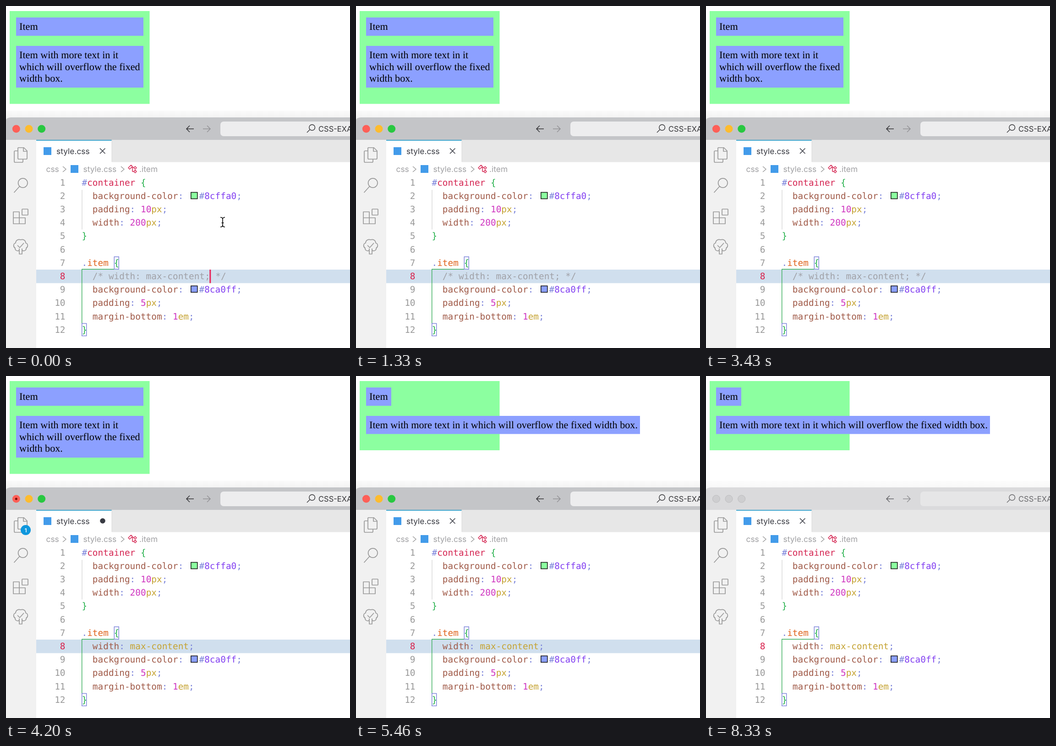
Write an HTML page that moves like this. It is 751x746 px and loops after 8.4 s.

```html
<!DOCTYPE html>
<html lang="en">
<head>
<meta charset="utf-8">
<title>max-content demo</title>
<style>
  html, body { margin: 0; width: 100%; height: 100%; overflow: hidden; background: #fff; }
  svg { display: block; width: 751px; height: 746px; }
  text { white-space: pre; text-rendering: geometricPrecision; }
  .page { font: 22.2px "Liberation Serif", serif; }
  .ui { font: 17.4px Inter, sans-serif; }
  .code { font: 19.4px "DejaVu Sans Mono", monospace; }
  .num { fill: #999; text-anchor: end; }
  .now { fill: #d8204c; }
  .punct { fill: #7a82da; }
  .id { fill: #d52753; }
  .class { fill: #df631c; }
  .brace { fill: #23b04a; }
  .prop { fill: #a05a48; }
  .value { fill: #c5a332; }
  .number { fill: #ce33c0; }
  .hex { fill: #823ff1; }
  .comment { fill: #a0a1a7; }
  .line { fill: none; stroke: #999; stroke-width: 1.7; stroke-linejoin: round; }
</style>
</head>
<body>
<svg viewBox="0 0 751 746">
  <defs>
    <linearGradient id="shade" x2="0" y2="1">
      <stop stop-color="#fbfbfb"/><stop offset="1" stop-color="#ebebeb"/>
    </linearGradient>
  </defs>

  <!-- Web page -->
  <g class="page">
    <rect id="box" x="8" y="11" width="305.5" fill="#8cffa0"/>
    <rect id="short" x="22" y="25" height="40" fill="#8ca0ff"/>
    <rect id="long" x="22" y="87" fill="#8ca0ff"/>
    <text x="29" y="52">Item</text>
    <g id="wrapped">
      <text x="29" y="114">Item with more text in it</text>
      <text x="29" y="139.7">which will overflow the fixed</text>
      <text x="29" y="165.4">width box.</text>
    </g>
    <text id="single" x="29" y="114">Item with more text in it which will overflow the fixed width box.</text>
  </g>

  <!-- Title bar -->
  <rect id="shadow" y="228" width="751" height="30" fill="url(#shade)"/>
  <path id="bar" d="M-2 292V255Q-2 243 12 243H751V292Z"/>
  <g id="lights">
    <circle cx="22.3" cy="268" r="8.5" fill="#fe5f57"/>
    <circle cx="50" cy="268" r="8.5" fill="#febc2e"/>
    <circle cx="77.7" cy="268" r="8.5" fill="#28c840"/>
    <circle id="unsaved" cx="22.3" cy="268" r="2.6" fill="#7d0a08"/>
  </g>
  <g id="dim" fill="#ceced0" stroke="#bdbdbf">
    <circle cx="22.3" cy="268" r="8"/><circle cx="50" cy="268" r="8"/><circle cx="77.7" cy="268" r="8"/>
  </g>
  <rect id="search" x="468" y="252" width="300" height="32" rx="7"/>
  <g id="title">
    <path d="M410 268H394M401 261L394 268L401 275" fill="none" stroke="currentColor" stroke-width="1.5"/>
    <path d="M430 268H446M439 261L446 268L439 275" fill="none" stroke="#929295" stroke-width="1.5"/>
    <path d="M663 270L657 276M674.5 265A6.3 6.3 0 1 1 661.9 265A6.3 6.3 0 1 1 674.5 265Z" fill="none" stroke="currentColor" stroke-width="1.4"/>
    <text class="ui" x="682" y="274" style="font-size:16.5px" fill="currentColor">CSS-EXAMPLES</text>
  </g>

  <!-- Activity bar -->
  <rect y="292" width="66" height="454" fill="#f1f1f1"/>
  <g class="line">
    <path d="M26 309H39L46 316V332Q46 334 44 334H28Q26 334 26 332V309M38 309V317H46M26 316H20Q18 316 18 318V339Q18 341 20 341H35Q37 341 37 339V334"/>
    <path d="M30 393L17.5 407M47 386A10.2 10.2 0 1 1 26.6 386A10.2 10.2 0 1 1 47 386Z"/>
    <path d="M16 449H29V462H42V475H16ZM16 462H29V475"/>
    <rect x="35" y="443" width="13" height="13" rx="1"/>
    <path d="M29 529V541H35V529M29 533C24 536 19 532 20 528C15 525 16 518 21 517C21 511 27 508 32 510C37 508 43 511 43 517C48 518 49 525 44 528C45 532 40 536 35 533M25 522L30 527L39 517"/>
  </g>
  <g id="badge">
    <circle cx="43" cy="336" r="11" fill="#0e97dd"/>
    <text class="ui" x="43" y="340.5" text-anchor="middle" style="font-size:12px;font-weight:600" fill="#fff">1</text>
  </g>

  <!-- Tab and breadcrumb -->
  <rect x="66" y="292" width="685" height="48.5" fill="#e7e7e7"/>
  <path d="M66 292H231V341H751V746H66Z" fill="#fff"/>
  <path d="M66 292.8H231" stroke="#2a9cc9" stroke-width="1.8"/>
  <path d="M231 292V340" stroke="#d8d8d8"/>
  <rect x="82" y="308" width="17" height="17" fill="#429bea"/>
  <rect x="141" y="347" width="17" height="17" fill="#429bea"/>
  <text class="ui" x="110" y="323" fill="#383a42">style.css</text>
  <path id="close" d="M205 310.5L216.500 322M216.500 310.500L205 322" stroke="#383a42" stroke-width="1.5"/>
  <circle id="dirty" cx="211" cy="316" r="5.8" fill="#383a42"/>
  <g class="ui" fill="#a0a0a3">
    <text x="87.500" y="362">css</text><text x="168.500" y="362">style.css</text><text x="291" y="362">.item</text>
  </g>
  <path class="line" d="M124 350L131 356L124 362M251 350L258 356L251 362" style="stroke-width:1.400"/>
  <path class="line" d="M267 353L273 347L276 350L270 356ZM274 352H279M276 352V361H279M279 353L282 350L285 353L282 356ZM279 361L282 358L285 361L282 364Z" style="stroke:#d52753;stroke-width:1.500"/>

  <!-- Editor -->
  <rect id="active" x="66" y="575" width="685" height="29.500" fill="#d0dfee"/>
  <path d="M166 401V487.500" stroke="#d4d4d4" stroke-width="1.300"/>
  <path d="M236 574.300H165.700V692" fill="none" stroke="#3aae5c" stroke-width="1.400"/>
  <g fill="none" stroke="#7a82da" stroke-width="1.400">
    <rect x="236.300" y="547" width="10" height="27"/><rect x="165.700" y="692.500" width="10" height="27"/>
  </g>
  <g id="code" class="code"></g>
  <g stroke="#111" stroke-width="1.500">
    <rect x="403.800" y="406.500" width="14" height="14" fill="#8cffa0"/>
    <rect x="403.800" y="610.500" width="14" height="14" fill="#8ca0ff"/>
  </g>
  <rect id="caret" y="575" width="3" height="29.500" fill="#e8245a"/>
  <path id="mouse" d="M468 461Q473 461 473 465V478Q473 482 468 482M478 461Q473 461 473 465M473 478Q473 482 478 482M470.500 473H475.500" fill="none" stroke="#111" stroke-width="1.700"/>
</svg>
<script>
const $ = id => document.getElementById(id);
const LOOP = 8400, LEFT = 165.5, CHAR = 11.68, PITCH = 29.18;
const EDIT = 3640, BADGE = 3990, SAVE = 4480, RELOAD = 4690, BLUR = 8330;
const BLINKS = [280, 770, 1330, 1820, 2380, 2870, 3430, EDIT, 4200,
  RELOAD, 5250, 5740, 6300, 6790, 7350, 7840, BLUR];

const token = (kind, text) => `<tspan class="${kind}">${text}</tspan>`;
const decl = (prop, value) =>
  '  ' + token('prop', prop) + token('punct', ':') + ' ' + value + token('punct', ';');
const size = (n, unit) => token('number', n) + token('value', unit);
const color = hex => `<tspan x="421.5" class="punct">#</tspan>` + token('hex', hex);
const open = (mark, kind, name) => token('punct', mark) + token(kind, name) + ' ' + token('brace', '{');

const commented = '  ' + token('comment', '/* width: max-content; */');
const enabled = decl('width', token('value', 'max-content'));
const lines = [
  open('#', 'id', 'container'),
  decl('background-color', color('8cffa0')),
  decl('padding', size(10, 'px')),
  decl('width', size(200, 'px')),
  token('brace', '}'),
  '',
  open('.', 'class', 'item'),
  commented,
  decl('background-color', color('8ca0ff')),
  decl('padding', size(5, 'px')),
  decl('margin-bottom', size(1, 'em')),
  token('brace', '}')
];
$('code').innerHTML = lines.map((line, i) => {
  const y = 391.7 + i * PITCH;
  return `<text class="num${i === 7 ? ' now' : ''}" x="129.5" y="${y}">${i + 1}</text>` +
    `<text id="line${i + 1}" x="${LEFT}" y="${y}">${line}</text>`;
}).join('');

const show = (id, on) => $(id).style.display = on ? '' : 'none';
const set = (id, attrs) => {
  for (const name in attrs) $(id).setAttribute(name, attrs[name]);
};
let wasEdited = false;

function draw(t) {
  const edited = t >= EDIT, fit = t >= RELOAD, focused = t < BLUR;
  const dirty = edited && t < SAVE;

  set('box', { height: fit ? 151 : 202.5 });
  set('short', { width: fit ? 55 : 278 });
  set('long', { width: fit ? 598 : 278, height: fit ? 39.5 : 91 });
  show('wrapped', !fit);
  show('single', fit);

  show('lights', focused);
  show('dim', !focused);
  show('active', focused);
  set('shadow', { opacity: focused ? 1 : 0.6 });
  set('bar', { fill: focused ? '#c4c5c8' : '#dadadc' });
  set('search', { fill: focused ? '#ededee' : '#e6e6e7' });
  set('title', { color: focused ? '#333336' : '#666669' });

  show('unsaved', dirty);
  show('dirty', dirty);
  show('close', !dirty);
  show('badge', dirty && t >= BADGE);

  if (edited !== wasEdited) {
    $('line8').innerHTML = edited ? enabled : commented;
    wasEdited = edited;
  }
  set('caret', { x: LEFT + CHAR * (edited ? 21 : 24) - 1.5 });
  show('caret', BLINKS.filter(b => b <= t).length % 2 === 0);
  show('mouse', t < 70);
}

const start = performance.now();
function frame() {
  draw((performance.now() - start) % LOOP);
  requestAnimationFrame(frame);
}
frame();
</script>
</body>
</html>
```
